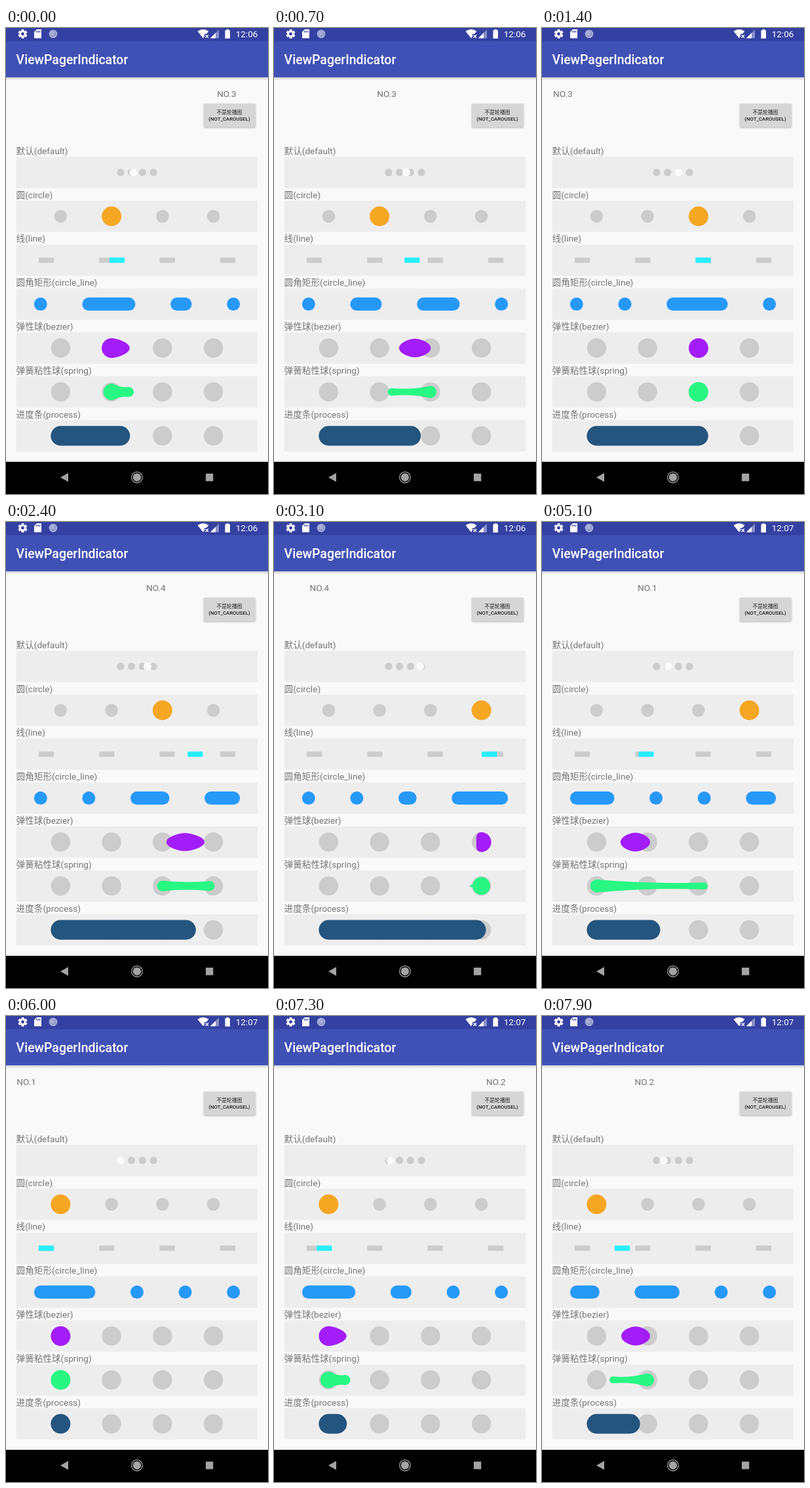
Recreate the animation shown at these times as an HTML page with a canvas. Size 400 px wide and 709 px high, loop 8000 ms.

```html
<!DOCTYPE html>
<html lang="zh">
<head>
<meta charset="utf-8">
<title>ViewPagerIndicator</title>
<style>
html, body { margin: 0; width: 100%; height: 100%; overflow: hidden; background: #f9f9f9; }
canvas { display: block; width: 400px; height: 709px; }
</style>
</head>
<body>
<canvas id="stage"></canvas>
<script>
const W = 400, H = 709, LOOP = 8000, COUNT = 4, LAST = COUNT - 1;
const canvas = document.getElementById('stage');
const ctx = canvas.getContext('2d');
const ratio = window.devicePixelRatio || 1;
canvas.width = W * ratio;
canvas.height = H * ratio;

const FONT = 'Roboto, "Noto Sans CJK SC", "Noto Sans CJK", sans-serif';
const GRAY = '#cccccc';
const LABELS = ['默认(default)', '圆(circle)', '线(line)', '圆角矩形(circle_line)',
  '弹性球(bezier)', '弹簧粘性球(spring)', '进度条(process)'];
const GAP = 77.75, FIRST = 200 - 1.5 * GAP, BIG = 15;

// Pager position over time: [ms, page]
const SCROLL = [
  [0, 1.17], [900, 1.745], [1000, 1.84], [1100, 1.92], [1200, 1.965], [1300, 1.99], [1400, 1.998],
  [1600, 2], [1800, 2], [2200, 2.4], [2300, 2.4], [2500, 2.527], [2600, 2.527], [2800, 2.696],
  [2900, 2.696], [3000, 2.8], [3100, 2.896], [3200, 2.955], [3300, 2.983], [3500, 3], [4100, 3],
  [4600, 3.219], [4700, 3.219], [5100, 3.648], [5600, 3.927], [5700, 3.927], [5800, 3.97],
  [5900, 3.99], [6000, 4], [7100, 4], [7900, 4.66]
];

const clamp = v => Math.max(0, Math.min(1, v));

function pageAt(t) {
  const i = SCROLL.findIndex(k => k[0] >= t);
  if (i <= 0) return SCROLL[0][1];
  const [t0, a] = SCROLL[i - 1], [t1, b] = SCROLL[i];
  return a + (b - a) * (t - t0) / (t1 - t0);
}

function selectedAt(t) {
  return t < 1000 ? 1 : t < 3000 ? 2 : t < 5800 ? 3 : 0;
}

function rect(x, y, w, h, color) {
  ctx.fillStyle = color;
  ctx.fillRect(x, y, w, h);
}

function circle(x, y, r, color) {
  ctx.fillStyle = color;
  ctx.beginPath();
  ctx.arc(x, y, r, 0, Math.PI * 2);
  ctx.fill();
}

function pill(left, right, y, r, color) {
  ctx.fillStyle = color;
  ctx.beginPath();
  ctx.arc(left + r, y, r, Math.PI / 2, Math.PI * 1.5);
  ctx.arc(right - r, y, r, -Math.PI / 2, Math.PI / 2);
  ctx.fill();
}

function polygon(points, color) {
  ctx.fillStyle = color;
  ctx.beginPath();
  points.forEach(([x, y]) => ctx.lineTo(x, y));
  ctx.fill();
}

function text(str, x, y, size, color, weight = 400, align = 'left') {
  ctx.font = `${weight} ${size}px ${FONT}`;
  ctx.textAlign = align;
  ctx.fillStyle = color;
  ctx.fillText(str, x, y);
}

function dots(y, r, gap, skip = -1) {
  for (let i = 0; i < COUNT; i++) {
    if (i !== skip) circle(200 + (i - 1.5) * gap, y, r, GRAY);
  }
}

function drawStatusBar(t) {
  rect(0, 0, W, 20, '#3441a2');
  const white = '#ffffff';
  ctx.save();
  ctx.translate(25.5, 9);
  for (let i = 0; i < 6; i++) {
    ctx.rotate(Math.PI / 3);
    rect(-1.9, -7, 3.8, 5, white);
  }
  circle(0, 0, 5.2, white);
  circle(0, 0, 2.4, '#3441a2');
  ctx.restore();

  polygon([[47, 2], [54, 2], [54, 15.5], [43, 15.5], [43, 6]], white);
  [46.2, 48.6, 51].forEach(x => rect(x, 4, 1.2, 3, '#3441a2'));

  circle(72, 9, 6.3, '#b4bae0');
  circle(72, 9, 5, '#8e97cc');
  circle(71, 8, 3.5, '#a5add8');

  ctx.fillStyle = white;
  ctx.beginPath();
  ctx.moveTo(301, 15.5);
  ctx.lineTo(292.5, 5);
  ctx.quadraticCurveTo(301, -1, 309.5, 5);
  ctx.lineTo(306, 9);
  ctx.lineTo(303, 9);
  ctx.lineTo(303, 13);
  ctx.fill();
  ctx.strokeStyle = white;
  ctx.lineWidth = 1.4;
  ctx.beginPath();
  ctx.moveTo(304.5, 10.5); ctx.lineTo(309, 15);
  ctx.moveTo(309, 10.5); ctx.lineTo(304.5, 15);
  ctx.stroke();

  polygon([[325, 2.5], [325, 15.5], [312, 15.5]], '#8890c8');
  polygon([[320, 7.5], [320, 15.5], [312, 15.5]], white);
  rect(334.5, 3.5, 7.5, 12.5, white);
  rect(336.5, 2, 3.5, 2, white);
  text(t < 3700 ? '12:06' : '12:07', 384.5, 14, 13.6, white, 400, 'right');
}

function drawChrome(t) {
  rect(0, 0, W, H, '#f9f9f9');
  const shadow = ctx.createLinearGradient(0, 75, 0, 80);
  shadow.addColorStop(0, '#cfcfd2');
  shadow.addColorStop(1, '#f9f9f9');
  rect(0, 75, W, 5, shadow);
  rect(0, 20, W, 55, '#4051b5');
  drawStatusBar(t);
  text('ViewPagerIndicator', 15.6, 55, 19.45, '#ffffff', 500);

  ctx.save();
  ctx.shadowColor = 'rgba(0,0,0,.28)';
  ctx.shadowBlur = 2.5 * ratio;
  ctx.shadowOffsetY = ratio;
  ctx.fillStyle = '#d6d6d6';
  ctx.beginPath();
  ctx.roundRect(302, 115, 79, 36, 2);
  ctx.fill();
  ctx.restore();
  text('不是轮播图', 341, 131, 7.8, '#222222', 500, 'center');
  text('(NOT_CAROUSEL)', 341, 140.5, 7.8, '#222222', 500, 'center');

  rect(0, 660, W, 49, '#000000');
  const nav = '#a3a3a3';
  polygon([[83, 683.7], [95, 677], [95, 690.4]], nav);
  circle(200, 683.7, 6.2, nav);
  ctx.strokeStyle = nav;
  ctx.lineWidth = 1.3;
  ctx.beginPath();
  ctx.arc(200, 683.7, 8.3, 0, Math.PI * 2);
  ctx.stroke();
  rect(305, 678, 11.3, 11.5, nav);
}

function drawPager(page) {
  ctx.save();
  ctx.beginPath();
  ctx.rect(15.5, 90, 369, 25);
  ctx.clip();
  const pos = Math.floor(page);
  for (const k of [pos, pos + 1]) {
    text('NO.' + (k % COUNT + 1), 16.3 + (k - page) * 368.5, 105, 13.6, '#757575');
  }
  ctx.restore();
}

function drawLine(y, value) {
  const bar = (i, color) => rect(200 + (i - 1.5) * 92.3 - 11.6, y - 4, 23.2, 8, color);
  for (let i = 0; i < COUNT; i++) bar(i, GRAY);
  bar(value, '#27eefb');
}

function drawCircleLine(y, pos, p) {
  const r = 10, gap = 73.6, start = 200 - 2 * gap, color = '#2699f7';
  const slot = i => start + i * gap;
  if (pos === LAST) {
    const shift = p * gap;
    pill(start - r, start + r + shift, y, r, color);
    pill(slot(3) - r + shift, slot(4) + r, y, r, color);
    for (let i = 1; i < LAST; i++) circle(slot(i) + shift, y, r, color);
    return;
  }
  pill(slot(pos) - r, slot(pos + 1) + r - p * gap, y, r, color);
  pill(slot(pos + 2) - r - p * gap, slot(pos + 2) + r, y, r, color);
  for (let i = 0; i <= COUNT; i++) {
    if (i < pos || i > pos + 2) circle(slot(i), y, r, color);
  }
}

// Front and back reach are in radii, measured along the travel direction.
function drawBezier(y, from, to, p) {
  const c = from + (to - from) * clamp((p - 0.2) / 0.6);
  const dir = Math.sign(to - from);
  let front = 1, back = 1, tall = 1;
  if (p <= 0.2) {
    front = 1 + p / 0.2;
  } else if (p <= 0.5) {
    const k = (p - 0.2) / 0.3;
    front = 2;
    back = 1 + k;
    tall = 1 - 0.1 * k;
  } else if (p <= 0.8) {
    const k = (0.8 - p) / 0.3;
    front = back = 1 + k;
    tall = 1 - 0.1 * k;
  } else {
    back = 0.5 + Math.abs(p - 0.9) * 5;
  }
  const m = 0.5523 * BIG, h = BIG * tall;
  const fx = c + dir * front * BIG, bx = c - dir * back * BIG, d = dir * m;
  ctx.fillStyle = '#a21df8';
  ctx.beginPath();
  ctx.moveTo(c, y - h);
  ctx.bezierCurveTo(c + d, y - h, fx, y - m, fx, y);
  ctx.bezierCurveTo(fx, y + m, c + d, y + h, c, y + h);
  ctx.bezierCurveTo(c - d, y + h, bx, y + m, bx, y);
  ctx.bezierCurveTo(bx, y - m, c - d, y - h, c, y - h);
  ctx.fill();
}

function drawSpring(y, from, to, p) {
  const color = '#28f783';
  const head = from + (to - from) * clamp(p * 2);
  const tail = from + (to - from) * clamp(p * 2 - 1);
  const headR = BIG * Math.max(0.5, p), tailR = BIG * (1 - p);
  const mid = (head + tail) / 2;
  circle(head, y, headR, color);
  circle(tail, y, tailR, color);
  ctx.beginPath();
  ctx.moveTo(tail, y - tailR);
  ctx.quadraticCurveTo(mid, y - tailR / 2, head, y - headR);
  ctx.lineTo(head, y + headR);
  ctx.quadraticCurveTo(mid, y + tailR / 2, tail, y + tailR);
  ctx.fill();
}

function drawIndicators(page, selected) {
  const pos = Math.floor(page) % COUNT, p = page % 1;
  const value = pos < LAST ? pos + p : LAST * (1 - p);
  const from = FIRST + pos * GAP;
  const to = FIRST + (pos + 1) % COUNT * GAP;
  const rowY = i => 219.7 + i * 66.8;

  LABELS.forEach((label, i) => {
    text(label, 15.6, rowY(i) - 28, 13.6, '#757575');
    rect(15.6, rowY(i) - 23.7, 368.6, 47.6, '#eeedee');
  });

  dots(rowY(0), 5.6, 16.7);
  circle(200 + (value - 1.5) * 16.7, rowY(0), 6, '#fafafa');

  dots(rowY(1), 9.8, GAP, selected);
  circle(FIRST + selected * GAP, rowY(1), BIG, '#f5a623');

  drawLine(rowY(2), value);
  drawCircleLine(rowY(3), pos, p);

  for (const i of [4, 5, 6]) dots(rowY(i), 14.7, GAP);
  drawBezier(rowY(4), from, to, p);
  drawSpring(rowY(5), from, to, p);
  pill(FIRST - BIG, FIRST + value * GAP + BIG, rowY(6), BIG, '#24557f');
}

const begin = performance.now();

function frame() {
  // The screen refreshes ten times a second.
  const t = Math.floor((performance.now() - begin) % LOOP / 100) * 100;
  const page = pageAt(t);
  ctx.setTransform(ratio, 0, 0, ratio, 0, 0);
  drawChrome(t);
  drawPager(page);
  drawIndicators(page, selectedAt(t));
  requestAnimationFrame(frame);
}
frame();
</script>
</body>
</html>
```
